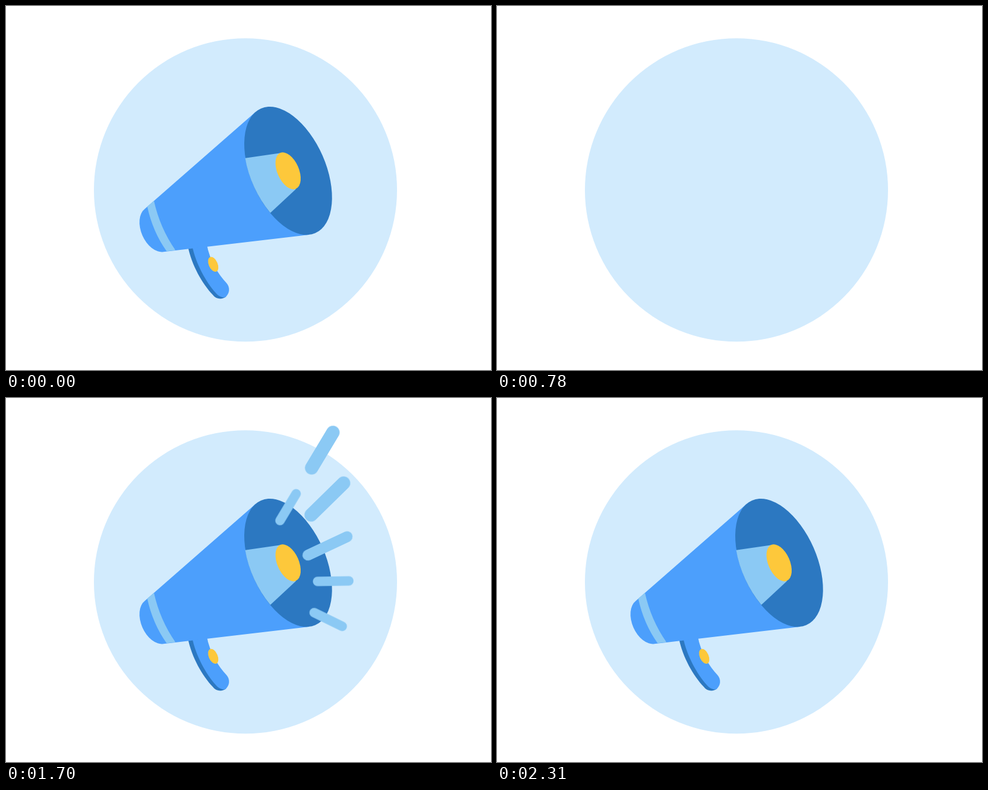
An HTML page for the animation above (2490 ms loop, 800 by 600 pixels).

```html
<!DOCTYPE html>
<html lang="en">
<head>
<meta charset="utf-8">
<title>Megaphone</title>
<style>
  html, body { margin: 0; width: 100%; height: 100%; overflow: hidden; background: #fff; }
  svg { display: block; width: 100vw; height: 100vh; }

  .sky { fill: #d2ebfd; }
  .blue { fill: #4c9ffc; }
  .dark { fill: #2c78c1; }
  .light { fill: #8bc9f4; }
  .gold { fill: #fdc83b; }

  .horn {
    transform-origin: 385px 528px;
    animation: swing 2490ms linear infinite, show 2490ms step-end infinite;
  }
  @keyframes swing {
    0%, 17.8% { transform: translate(0, 0) rotate(0deg); }
    20.08% { transform: translate(.2px, .2px) rotate(-.9deg); }
    22.09% { transform: translate(.4px, .4px) rotate(-2.3deg); }
    24.1% { transform: translate(.7px, .8px) rotate(-5deg); }
    26.1% { transform: translate(.5px, .5px) rotate(-10.5deg); }
    28.11% { transform: translate(0, 0) rotate(-21deg); }
    29.72% { transform: translate(0, 0) rotate(-36deg); }
    31.3% { transform: translate(0, 0) rotate(-56deg); }
    53.7%, 53.82% { transform: translate(0, 0) rotate(-49.5deg); }
    55.82% { transform: translate(0, 0) rotate(-24deg); }
    57.83% { transform: translate(0, 0) rotate(-11.5deg); }
    59.84% { transform: translate(0, 0) rotate(-5deg); }
    61.85% { transform: translate(0, 0) rotate(-2deg); }
    63.86% { transform: translate(0, 0) rotate(-.6deg); }
    65.86%, 100% { transform: translate(0, 0) rotate(0deg); }
  }
  @keyframes show {
    0% { opacity: 1; }
    31.3% { opacity: 0; }
    53.78%, 100% { opacity: 1; }
  }

  /* Each dash grows from its root, travels out and shrinks at the far end. */
  .rays path {
    fill: none;
    stroke: #8bc9f4;
    stroke-linecap: round;
    opacity: 0;
    animation: dash 2490ms linear var(--at) infinite, thick 2490ms linear var(--at) infinite,
      life 2490ms step-end var(--at) infinite;
  }
  @keyframes dash {
    0% { stroke-dasharray: 0 400; stroke-dashoffset: 0; }
    6.345% { stroke-dasharray: 79 400; stroke-dashoffset: 0; }
    14.458% { stroke-dasharray: 67 400; stroke-dashoffset: -113; }
    19.277%, 100% { stroke-dasharray: 0 400; stroke-dashoffset: -180; }
  }
  @keyframes thick {
    0% { stroke-width: 10px; }
    8.755%, 13.735% { stroke-width: 22px; }
    19.277%, 100% { stroke-width: 12px; }
  }
  @keyframes life {
    0% { opacity: 1; }
    18.87%, 100% { opacity: 0; }
  }
</style>
</head>
<body>
<svg viewBox="0 0 800 600">
  <defs>
    <clipPath id="disc"><circle cx="395" cy="303.3" r="250"/></clipPath>
  </defs>

  <circle class="sky" cx="395" cy="303.3" r="250"/>

  <g clip-path="url(#disc)">
    <g class="horn">
      <path class="dark" d="M300 396C306 427 324 458 341 476C347 484 357 484 363 479L345 440L320 390Z"/>
      <path class="blue" d="M307 395C313 425 330 455 346 473C351 479 357 481 362 480C369 474 370 464 364 457C350 442 336 420 331 392Z"/>
      <ellipse class="gold" cx="341.8" cy="425.8" rx="7.3" ry="13" transform="rotate(-23.5 341.8 425.8)"/>
      <g transform="translate(465.4 271.6) rotate(-23.6)">
        <path class="blue" d="M-10.2 -110.5L-242 -37A25 39 0 0 0 -242 40L-10.2 110.5Z"/>
      </g>
      <path class="light" d="M233 330.5L244 321Q254 366 279.5 402.5L265 404.3Q242 372 233 330.5Z"/>
      <g transform="translate(465.4 271.6) rotate(-23.6)">
        <ellipse class="dark" rx="62" ry="112"/>
      </g>
      <path class="light" d="M394.5 250.8L455 242L478 302L436 341A62 112 -23.6 0 1 394.5 250.8Z"/>
      <ellipse class="gold" cx="465.3" cy="271.7" rx="17.8" ry="32.3" transform="rotate(-23.6 465.3 271.7)"/>
    </g>
  </g>

  <g class="rays">
    <g transform="translate(452 202) rotate(-59)">
      <path d="M0 0H180" style="--at:1362ms"/>
      <path d="M0 0H180" style="--at:1598ms"/>
    </g>
    <g transform="translate(476.5 219) rotate(-44.4)">
      <path d="M0 0H180" style="--at:1476ms"/>
      <path d="M0 0H180" style="--at:1714ms"/>
    </g>
    <g transform="translate(498 259) rotate(-25.2)">
      <path d="M0 0H180" style="--at:1558ms"/>
      <path d="M0 0H180" style="--at:1798ms"/>
    </g>
    <g transform="translate(514 302.3) rotate(-.9)">
      <path d="M0 0H180" style="--at:1598ms"/>
      <path d="M0 0H180" style="--at:1836ms"/>
    </g>
    <g transform="translate(508.3 353.8) rotate(26)">
      <path d="M0 0H180" style="--at:1598ms"/>
      <path d="M0 0H180" style="--at:1836ms"/>
    </g>
  </g>
</svg>
</body>
</html>
```
